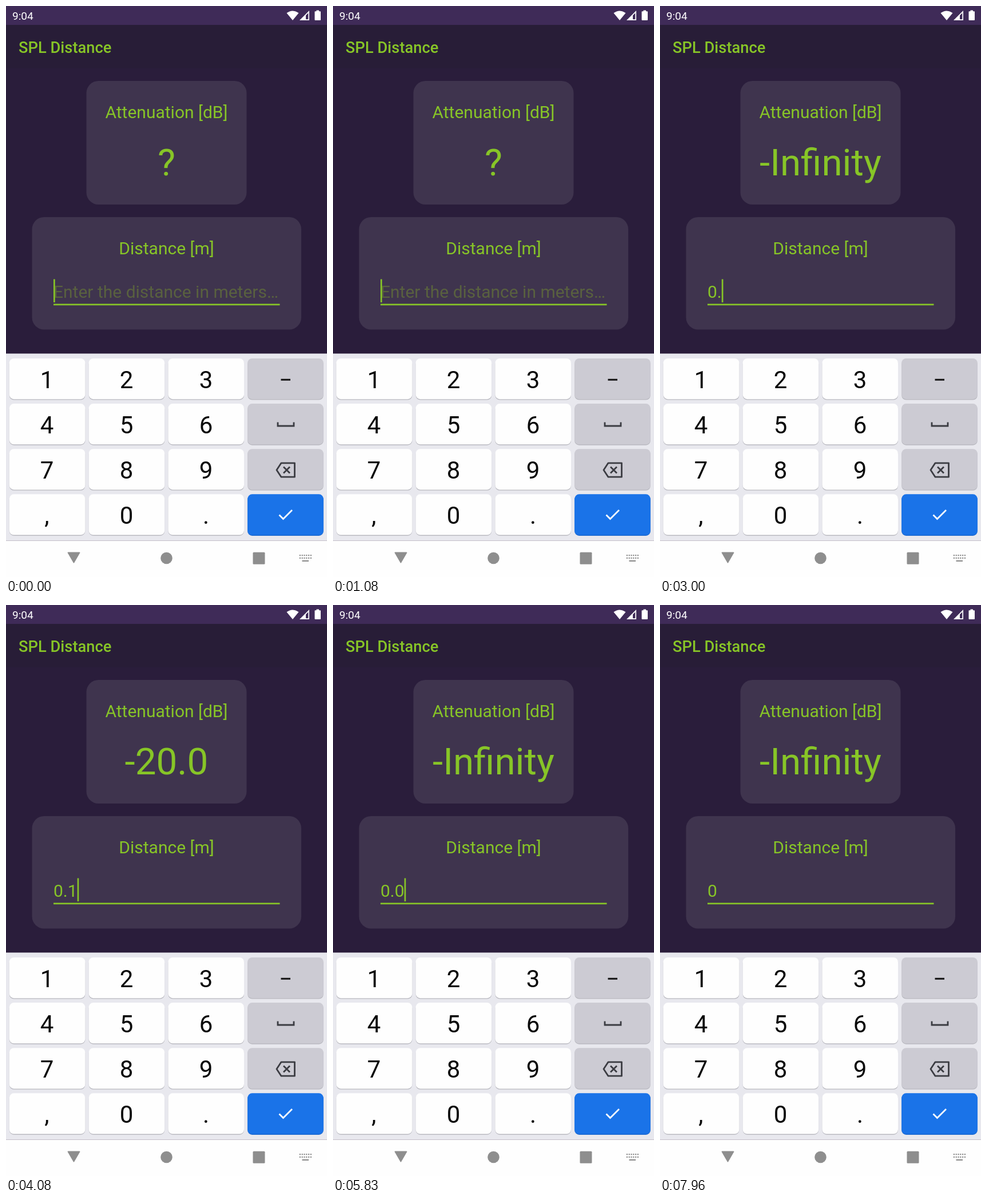
Animation, 561 px wide and 998 px high, one loop 8 s. Source, as an HTML page:

```html
<!DOCTYPE html>
<html lang="en">
<head>
<meta charset="utf-8">
<title>SPL Distance</title>
<style>
  html, body { margin: 0; width: 100%; height: 100%; overflow: hidden; background: #2a1d3b; }
  svg { display: block; width: 100%; height: 100%; font-family: Roboto, sans-serif; }
  .green { fill: #87c527; font-size: 30px; }
  .mid { text-anchor: middle; }
  .card { fill: #3f344e; }
  .nav { fill: #8e8e8e; }
  .icon { fill: none; stroke: #3b3c42; stroke-width: 2.8; }
</style>
</head>
<body>
<svg viewBox="0 0 561 998">
  <rect width="561" height="998" fill="#2a1d3b"/>
  <rect y="33" width="561" height="76" fill="#281d37"/>
  <rect width="561" height="33" fill="#3f2b58"/>

  <!-- status bar -->
  <text x="11" y="24" font-size="19.1" fill="#fff">9:04</text>
  <g fill="#fff">
    <path d="M501 25 L490.5 12.3 Q501 4.5 511.500 12.300 Z"/>
    <path d="M513 25 L530 8 V25 Z M524 23.300 H528.300 V12.200 L524 16.500 Z" fill-rule="evenodd"/>
    <path d="M542.500 7.500 H547 V9.200 H549 Q550 9.200 550 10.200 V24 Q550 25 549 25 H540.500 Q539.500 25 539.500 24 V10.200 Q539.500 9.200 540.500 9.200 H542.500 Z"/>
  </g>

  <text class="green" x="22" y="81.500" style="font-size:27.300px;font-weight:500">SPL Distance</text>

  <rect class="card" x="140.500" y="131" width="280" height="216" rx="21"/>
  <text class="green mid" x="280.500" y="196">Attenuation [dB]</text>
  <text class="green mid" id="result" x="280.500" y="296" style="font-size:65.500px"></text>

  <rect class="card" x="45.500" y="369" width="470.500" height="196.500" rx="21"/>
  <text class="green mid" x="280.500" y="433.500">Distance [m]</text>
  <text class="green" id="hint" x="83" y="509.500" style="fill:#59613f">Enter the distance in meters…</text>
  <text class="green" id="field" x="83" y="509.500"></text>
  <rect class="green" x="83" y="520.500" width="395.500" height="2.700"/>
  <rect class="green" id="cursor" y="477.500" width="2.700" height="40.500"/>

  <!-- keyboard -->
  <rect y="607.500" width="561" height="327" fill="#e8e8ee"/>
  <g id="keys"></g>
  <rect x="480.500" y="651.700" width="16.500" height="3" fill="#111"/>
  <path class="icon" d="M475 727.500 V734 H503 V727.500"/>
  <path class="icon" stroke-linejoin="round" d="M473 811 L481 798.800 H504.500 V823.200 H481 Z M485 805.500 L496 816.500 M496 805.500 L485 816.500"/>
  <path class="icon" style="stroke:#fff" d="M477.500 889.500 L484.500 896.500 L500 881"/>

  <!-- navigation bar -->
  <rect y="934.500" width="561" height="64" fill="#fefefe"/>
  <g class="nav">
    <path d="M108.500 954.500 H128.500 Q130 954.500 129.200 956 L119.500 972.800 Q118.500 974.500 117.500 972.800 L107.800 956 Q107 954.500 108.500 954.500 Z"/>
    <circle cx="280.500" cy="965" r="10.300"/>
    <rect x="431.500" y="954.700" width="21" height="21" rx="1.500"/>
    <rect x="517.500" y="968.800" width="11.500" height="2.200"/>
  </g>
  <path d="M512.800 960.200 H534 M512.800 964.800 H534" stroke="#8e8e8e" stroke-width="2.200" stroke-dasharray="2.200 1.600"/>
</svg>
<script>
const LOOP = 8000;
const BLINK = 500;
// [time of edit in ms, field content]
const EDITS = [
  [-250, ""], [2250, "0"], [2700, "0."], [3850, "0.1"],
  [5350, "0."], [5800, "0.0"], [6700, "0.01"],
  [7080, "0.0"], [7250, "0."], [7420, "0"]
];
const byId = id => document.getElementById(id);
const [result, hint, field, cursor] = ["result", "hint", "field", "cursor"].map(byId);

function drawKeys() {
  const rows = ["123 ", "456 ", "789 ", ",0. "];
  let markup = "";
  rows.forEach((row, r) => [...row].forEach((label, c) => {
    const x = 5.8 + 138.8 * c;
    const y = 616 + 79.1 * r;
    const action = c === 3;
    const fill = !action ? "#fefefe" : r === 3 ? "#1a73e8" : "#cccbd3";
    const shadow = action && r === 3 ? "#1a68cf" : "#b9b9c0";
    const box = (top, color) =>
      `<rect x="${x}" y="${top}" width="132.6" height="71.2" rx="8" fill="${color}"/>`;
    markup += box(y + 1.4, shadow) + box(y, fill);
    if (!action) {
      markup += `<text class="mid" x="${71.5 + 139 * c}" y="${y + 52}" font-size="42" fill="#080808">${label}</text>`;
    }
  }));
  byId("keys").innerHTML = markup;
}

function attenuation(text) {
  return text ? (20 * Math.log10(parseFloat(text))).toFixed(1) : "?";
}

function render(t) {
  const [since, text] = EDITS.findLast(edit => edit[0] <= t);
  if (field.textContent !== text || !result.textContent) {
    field.textContent = text;
    result.textContent = attenuation(text);
    hint.style.display = text ? "none" : "";
  }
  cursor.setAttribute("x", 83 + (text ? field.getComputedTextLength() : 0));
  cursor.style.display = (t - since) % (2 * BLINK) < BLINK ? "" : "none";
}

drawKeys();
const start = performance.now();
function tick() {
  render((performance.now() - start) % LOOP);
  requestAnimationFrame(tick);
}
tick();
</script>
</body>
</html>
```
